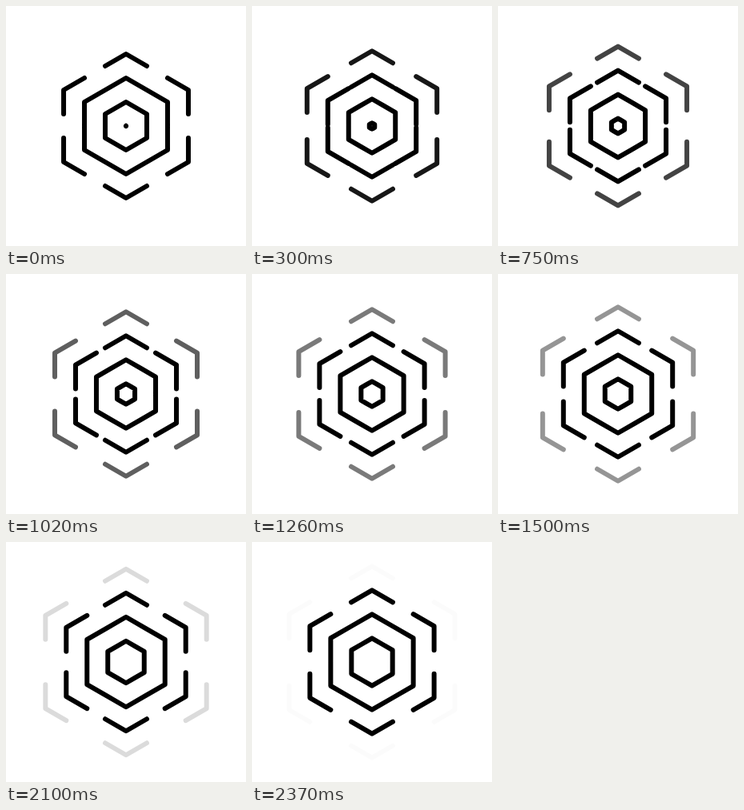
An HTML page with a canvas for the animation above (2.4 s loop, 300 px wide and 300 px high).

```html
<!DOCTYPE html>
<html>
<head>
<meta charset="utf-8">
<style>
  html, body { margin: 0; width: 100%; height: 100%; overflow: hidden; background: #fff; }
  canvas { display: block; }
</style>
</head>
<body>
<canvas width="300" height="300"></canvas>
<script>
const LOOP = 2400, STEP = 30, CENTER = 150, ARM = 30;
const ctx = document.querySelector('canvas').getContext('2d');
ctx.lineWidth = 6;
ctx.lineCap = ctx.lineJoin = 'round';

// Six corner chevrons: they close into a hexagon until the arms reach full length.
function drawRing(radius, alpha) {
  const arm = Math.min(radius / 2, ARM);
  ctx.globalAlpha = alpha;
  ctx.beginPath();
  for (let i = 0; i < 6; i++) {
    const angle = (i * 2 + 1) * Math.PI / 6;
    const x = CENTER + radius * Math.cos(angle);
    const y = CENTER + radius * Math.sin(angle);
    const end = turn => [x + arm * Math.cos(angle + turn), y + arm * Math.sin(angle + turn)];
    ctx.moveTo(...end(-Math.PI * 2 / 3));
    ctx.lineTo(x, y);
    ctx.lineTo(...end(Math.PI * 2 / 3));
  }
  ctx.stroke();
}

function draw(time) {
  const t = time % LOOP / LOOP;
  ctx.clearRect(0, 0, 300, 300);
  for (let i = 0; i < 4; i++) {
    const radius = (i + t) * STEP;
    if (radius > 0) drawRing(radius, i < 3 ? 1 : 1 - t ** 1.15);
  }
}

const start = performance.now();
function tick() {
  draw(performance.now() - start);
  requestAnimationFrame(tick);
}
draw(0);
requestAnimationFrame(tick);
</script>
</body>
</html>
```
